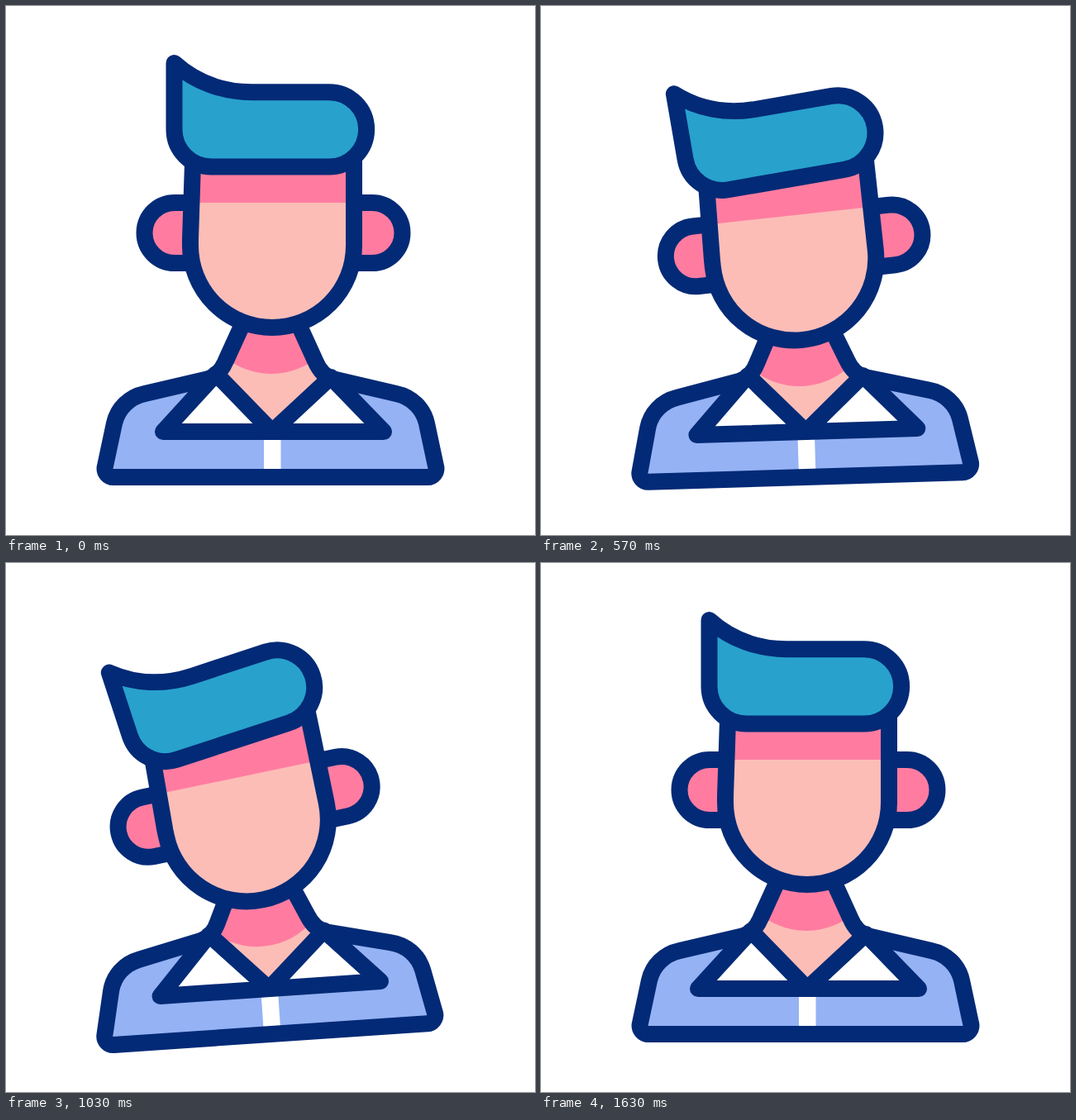
Recreate the animation shown at these times as an HTML page. Size 640 px wide and 640 px high, loop 2000 ms.

```html
<!DOCTYPE html>
<html lang="en">
<head>
<meta charset="utf-8">
<title>Head tilt</title>
<style>
  html, body { margin: 0; width: 100%; height: 100%; overflow: hidden; background: #fff; }
  svg { display: block; width: 100%; height: 100%; }
  .line { stroke: #032a76; stroke-width: 20; stroke-linecap: round; stroke-linejoin: round; }
  .open { fill: none; }
  .butt { stroke-linecap: butt; }
  .skin { fill: #fcbdb7; }
  .pink { fill: #ff7ca0; }
  .shirt { fill: #94b2f4; }
  .white { fill: #fff; }
  .hair { fill: #28a1cd; }
</style>
</head>
<body>
<svg viewBox="0 0 640 640">
  <defs>
    <clipPath id="neckClip">
      <path id="neck" d="M292 372 L266 429 L254 445 L322 515 L393 449 L374 429 L348 372 Z"/>
    </clipPath>
  </defs>
  <g id="body">
    <path class="shirt" d="M243 451.500 L168 469 C149 473 135 487 131 505 L120 560 L130 570 H510 L520 560 L509 505 C505 487 491 473 472 469 L397 451.500 Z"/>
    <rect class="white" x="312" y="515" width="20.500" height="50"/>
    <use href="#neck" class="skin"/>
    <g clip-path="url(#neckClip)">
      <circle id="shade" class="pink" cx="321" cy="357" r="88"/>
    </g>
    <path class="line open" d="M292 372 L266 429 C261 441 254 449 243 451.500 L168 469 C149 473 135 487 131 505 L119.700 558 A10.300 10.300 0 0 0 130 570 H510 A10.300 10.300 0 0 0 520.300 558 L509 505 C505 487 491 473 472 469 L397 451.500 C386 449 379 441 374 429 L348 372"/>
    <path class="line white" d="M190 515 L254 445 L322 515 L393 449 L457 515 Z"/>
    <g id="head">
      <path class="line pink" d="M226 238 H204 a36.500 36.500 0 0 0 0 73 H226 M420 238 H443 a36.500 36.500 0 0 1 0 73 H420"/>
      <path class="skin" d="M226 164 L223 290 A99 99 0 0 0 421 290 V160 Z"/>
      <path class="pink" d="M226 164 L224.500 238 H421 V160 Z"/>
      <path class="line open butt" d="M226 164 L226 190 L223 282 V290 A99 99 0 0 0 421 290 V160"/>
      <path id="hair" class="line hair" d="M203.500 69 V149.500 A45 45 0 0 0 248.500 194.500 H391 A45 45 0 0 0 391 104.200 H297 C262 104 229 92 203.500 69 Z"/>
    </g>
  </g>
</svg>
<script>
  const LOOP = 2000, FRAME = 100 / 3;

  // Key times in frames, and each part's value at those times
  const keyTimes = [0, 11.57, 23.5, 35.42, 48.5];
  const bodyTurn = [0, -9.3, 8.2, -9.3, 0];
  const headTurn = [0, -16.6, 11.4, -16.6, 0];
  const hairTurn = [0, -13.4, 9.2, -13.4, 0];
  const headDrop = [0, 26, 0, 26, 0];

  // Horizontal Bezier handles of the ease in each segment
  const handles = [[0.333, 0.55], [0.333, 0.667], [0.333, 0.667], [0.333, 0.38]];

  const part = id => document.getElementById(id);
  const [body, head, shade, hair] = ['body', 'head', 'shade', 'hair'].map(part);

  function ease(x, [x1, x2]) {
    let low = 0, high = 1, s = 0.5;
    for (let i = 0; i < 24; i++) {
      s = (low + high) / 2;
      const at = 3 * (1 - s) ** 2 * s * x1 + 3 * (1 - s) * s * s * x2 + s ** 3;
      if (at < x) low = s; else high = s;
    }
    return s * s * (3 - 2 * s);
  }

  function pose(frame) {
    const time = Math.min(frame, keyTimes[4]);
    let i = 0;
    while (i < 3 && time >= keyTimes[i + 1]) i++;
    const p = ease((time - keyTimes[i]) / (keyTimes[i + 1] - keyTimes[i]), handles[i]);
    const value = keys => (keys[i] + (keys[i + 1] - keys[i]) * p).toFixed(4);

    const headMove = `translate(0 ${value(headDrop)}) rotate(${value(headTurn)} 322 389)`;
    body.setAttribute('transform', `rotate(${value(bodyTurn)} 322 570)`);
    head.setAttribute('transform', headMove);
    shade.setAttribute('transform', headMove);
    hair.setAttribute('transform', `rotate(${value(hairTurn)} 317 145)`);
  }

  const start = performance.now();
  function tick() {
    const t = (performance.now() - start) % LOOP;
    pose(Math.floor((t + 3.4) / FRAME) % 60);
    requestAnimationFrame(tick);
  }
  tick();
</script>
</body>
</html>
```
